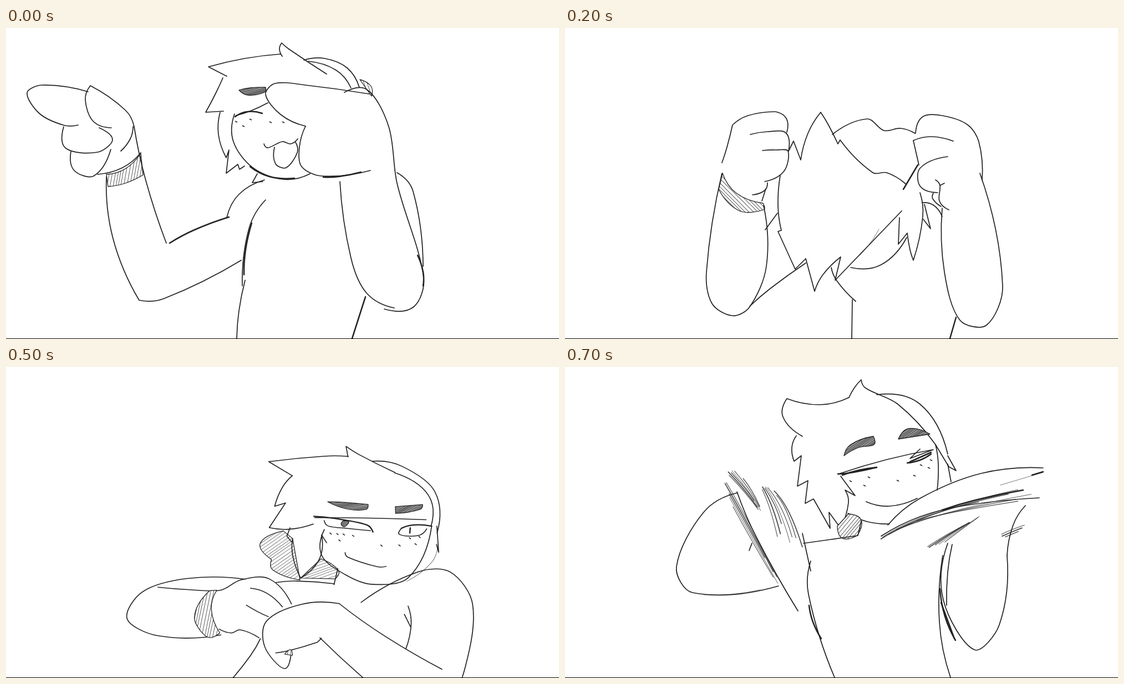
An HTML page with a canvas that plays this animation: 997 by 561 pixels, repeating every 800 ms.

```html
<!DOCTYPE html>
<html>
<head>
<meta charset="utf-8">
<style>
html, body { margin: 0; width: 100%; height: 100%; overflow: hidden; background: #fff; }
canvas { display: block; }
</style>
</head>
<body>
<canvas id="stage" width="997" height="561"></canvas>
<script>
const ctx = document.getElementById("stage").getContext("2d");

const add = (p, v, k) => [p[0] + v[0] * k, p[1] + v[1] * k];
const dist = (a, b) => Math.hypot(a[0] - b[0], a[1] - b[1]);
const points = text => text.trim().split(" ").map(p => p.split(",").map(Number));
const noise = n => Math.abs(Math.sin(n * 127.1) * 437.5) % 1;

// Smooth line through the points; "|" makes a corner.
function curve(text) {
  const path = new Path2D();
  let last;
  for (const part of text.split("|")) {
    const pts = points(part);
    if (last) pts.unshift(last);
    else path.moveTo(...pts[0]);
    const slope = pts.map((p, i) => {
      const a = pts[i - 1], b = pts[i + 1];
      return a && b && add([0, 0], add(b, a, -1), 1 / (dist(a, p) + dist(p, b)));
    });
    for (let i = 1; i < pts.length; i++) {
      const a = pts[i - 1], b = pts[i], d = dist(a, b);
      const s = slope[i - 1], e = slope[i];
      if (s && e) path.bezierCurveTo(...add(a, s, d / 3), ...add(b, e, -d / 3), ...b);
      else if (s) path.quadraticCurveTo(...add(a, s, d / 2), ...b);
      else if (e) path.quadraticCurveTo(...add(b, e, -d / 2), ...b);
      else path.lineTo(...b);
    }
    last = pts[pts.length - 1];
  }
  return path;
}

function ink(path, width, alpha = 1) {
  ctx.lineWidth = width;
  ctx.globalAlpha = alpha;
  ctx.stroke(path);
  ctx.globalAlpha = 1;
}
const pen = text => ink(curve(text), 1.7);
const bold = text => ink(curve(text), 2.5);
const thin = text => ink(curve(text), 1, 0.6);

function hatch(angle, text, gap = 5, alpha = 0.75, tone = "#fff", edge = 1.3) {
  const path = curve(text), lines = new Path2D();
  for (let i = -40; i <= 40; i++) {
    lines.moveTo(-150, i * gap + Math.sin(i * 7));
    lines.lineTo(150, i * gap + Math.sin(i * 5));
  }
  ctx.save();
  ctx.clip(path);
  ctx.fillStyle = tone;
  ctx.fill(path);
  ctx.translate(...points(text.split("|")[0])[0]);
  ctx.rotate(angle * Math.PI / 180);
  ink(lines, 1, alpha);
  ctx.restore();
  if (edge) ink(path, edge);
}
const dark = (angle, text) => hatch(angle, text, 2.6, 0.75, "#999");
const shade = text => hatch(90, text, 3, 0.3, "#fff", 0);

function dots(text) {
  for (const [x, y] of points(text)) {
    const path = new Path2D();
    path.moveTo(x - 1.5, y - 0.7);
    path.lineTo(x + 1.5, y + 0.7);
    ink(path, 1.7);
  }
}

// Loose strokes filling the band between two curves of three points each.
function streaks(count, from, to) {
  const [a, b] = [points(from), points(to)];
  for (let i = 0; i < count; i++) {
    const k = i / (count - 1);
    const [p, m, q] = a.map((v, j) => add(v, add(b[j], v, -1), k));
    const start = add(p, add(m, p, -1), noise(i + 1) * 0.5);
    const end = add(q, add(m, q, -1), noise(i + 9) * 0.6);
    const path = new Path2D();
    path.moveTo(...start);
    path.quadraticCurveTo(...m, ...end);
    ink(path, 0.9 + noise(i + 5), 0.8);
  }
}

function point() {
  // pointing hand
  pen("130,175 103,175 60,154 38,117 65,103 148,115");
  pen("231,178 215,148 152,104 | 143,130 157,168 190,180");
  pen("229,178 224,200 207,222");
  pen("168,180 192,202 165,224 108,217 104,178");
  pen("117,223 123,257 158,267 189,219");
  pen("165,264 210,252 243,225");
  hatch(100, "181,264 215,254 243,226 | 247,265 | 215,280 184,286 | 181,264");
  pen("181,268 193,380 240,491 | 285,488 424,419");
  pen("231,178 252,275 289,388");
  bold("295,388 340,364 402,341");
  // body
  pen("398,342 420,300 466,274");
  pen("453,263 444,279 | 463,277");
  pen("468,310 438,362 426,465");
  bold("443,352 432,400 429,445");
  pen("431,455 420,510 416,560");
  bold("648,485 624,560");
  // head
  pen("495,47 430,55 365,70 | 398,87");
  pen("391,90 378,118 360,152 | 392,150");
  pen("386,152 383,192 397,234 | 402,220 | 397,262 | 418,246 | 421,255 | 430,249");
  pen("498,51 493,38 497,27 | 510,38 578,83");
  pen("537,58 575,55 615,72 637,107");
  pen("545,60 595,76 622,108");
  hatch(70, "638,93 658,105 659,123 | 638,93");
  pen("412,155 410,205 445,252 500,273 548,263");
  bold("440,250 475,268 520,271");
  pen("414,158 440,150 472,135");
  bold("413,160 435,151 462,154");
  dark(-15, "420,112 440,108 468,107 | 466,116 436,121 420,112");
  dots("428,177 441,165 477,170 415,169 500,170");
  pen("465,209 472,216 498,205 513,209 526,200");
  pen("484,215 486,245 505,252 525,225 522,206");
  // near arm
  pen("540,177 495,156 468,120 485,100 540,103 655,119");
  pen("540,177 529,215 533,250 570,267 657,257");
  bold("572,269 600,268 640,260");
  pen("610,116 652,112 690,178 705,280 753,450 735,503 682,507");
  pen("602,277 622,415 650,478 700,505");
  pen("705,261 734,295 752,430");
  bold("742,410 752,440 752,465");
}

function wave() {
  // open hand
  pen("236,152 185,118 138,119 146,147 194,179 | 192,196");
  thin("236,152 262,160");
  pen("262,160 290,108 325,91 333,130 307,190");
  pen("307,190 309,238 297,270 275,292");
  pen("194,197 130,210 106,248 135,266 183,250 197,228");
  pen("187,248 146,308 180,323 222,302 229,265");
  hatch(-40, "230,289 250,295 278,293 | 265,312 222,303 | 230,289");
  // body
  pen("157,320 130,385 134,438 215,449 330,437 445,393");
  pen("266,312 244,370 229,395");
  pen("244,360 290,353 362,347");
  pen("358,347 390,323 428,304");
  pen("432,370 445,394 | 455,408 462,440 476,487");
  pen("474,482 478,560");
  pen("688,392 670,461");
  pen("671,458 671,560");
  pen("670,383 745,407 848,409 | 865,395 865,368 | 825,307 732,237");
  pen("683,280 745,360 797,393");
  pen("620,283 655,282 694,307");
  pen("655,262 675,277 697,280");
  // hand at the face
  pen("730,245 720,185 665,127 600,88 582,105 614,154");
  pen("629,155 570,185 560,218 638,208");
  pen("638,208 605,238 586,273 662,263");
  // head
  pen("397,73 470,97 500,99");
  pen("499,99 498,70 502,38 | 526,68 575,102");
  pen("397,73 390,100 388,130 | 370,137 352,138 | 358,158 372,178");
  pen("383,182 361,206 357,232 385,222 | 382,240 386,250 | 397,246");
  pen("455,88 475,80 498,76");
  pen("533,73 558,70 590,88");
  hatch(60, "588,82 610,77 650,90 | 648,107 | 615,95 588,82");
  pen("403,160 399,240 430,295 493,320 555,294 576,270");
  bold("450,308 493,320 562,288");
  pen("398,156 440,160 557,160 | 530,171 | 590,172");
  dark(-30, "405,172 425,153 446,148 | 447,157 428,170 405,172");
  dark(-30, "486,158 505,154 553,160 | 535,170 | 486,164 | 486,158");
  shade("410,172 447,172 | 450,204 | 410,202");
  shade("503,172 528,173 | 526,197 | 504,206");
  shade("540,174 560,176 | 558,188 | 540,192");
  bold("403,206 430,205 452,209");
  bold("410,201 430,203 450,208");
  bold("504,209 530,196 562,189");
  dots("412,216 421,228 441,219 460,239 486,239 526,217 541,215 546,207");
  pen("469,267 480,270 501,261 549,237 | 542,268 512,298 485,269");
}

function fists() {
  // left arm
  pen("283,243 292,215 302,175 | 330,158 380,151 | 399,163 400,188");
  pen("334,192 365,187 398,189 403,222");
  pen("356,221 380,220 402,222 395,258 360,277");
  pen("365,279 360,293 338,301");
  pen("362,290 355,312");
  hatch(45, "284,262 309,298 357,316 | 358,328 315,330 277,291 | 284,262");
  pen("283,262 255,440 265,497 302,519 333,503 363,430 358,320");
  pen("333,502 370,470 434,424");
  pen("361,364 383,334");
  // hair
  pen("403,222 412,204 | 425,238 | 438,190 461,152 | 475,175 492,209 | 496,202 | 555,261 580,261 614,281");
  pen("482,192 545,164 575,185 605,181 631,190");
  pen("388,266 384,320 390,365 | 384,367 | 415,435 | 434,416 | 450,475 | 465,445 497,413 | 487,455 | 607,330");
  thin("520,420 545,395 566,363");
  pen("480,432 490,456 524,493");
  pen("518,490 517,560");
  pen("515,432 570,427 616,378");
  pen("603,342 601,390 | 617,370 | 622,400 628,419 | 645,340 640,297");
  bold("610,291 636,247");
  pen("646,345 659,362 | 648,318");
  pen("644,315 665,320 680,340");
  // right arm
  pen("632,190 645,160 680,158 725,174 746,205 752,275");
  pen("628,203 660,196 700,204");
  pen("628,203 638,247");
  pen("690,232 640,253 640,285 672,297");
  pen("668,274 | 676,284 675,312 692,328");
  pen("676,284 684,280");
  pen("664,298 663,308 678,322");
  pen("680,325 684,440 712,527 760,536 789,465 748,262");
  bold("705,522 694,560");
}

function bow() {
  pen("390,158 470,122 560,111 680,146");
  thin("680,146 725,187 751,235");
  streaks(4, "392,157 510,118 683,160", "400,156 510,137 668,172");
  thin("556,120 530,119 495,133");
  pen("495,133 443,200 478,249");
  thin("655,147 625,145 600,153");
  pen("600,153 563,200 579,248");
  thin("362,182 362,185");
  // back
  pen("380,560 360,440 380,322 430,272 500,257 545,264 595,263 655,315 675,391");
  bold("527,262 545,264");
  bold("645,300 660,325 668,350");
  pen("294,560 320,458 366,363");
  // head
  pen("597,262 650,240 705,266 733,323");
  pen("711,270 723,252 | 743,288");
  pen("733,323 755,243 | 774,285 769,338 | 777,335 | 750,362 732,394");
  pen("700,342 701,322 | 710,333 | 717,317 | 724,330 | 731,320");
  pen("763,353 772,388 747,430");
  // near arm
  pen("663,321 715,360 745,445 804,560");
  bold("703,346 738,422 747,455");
  pen("665,400 640,425 627,500 637,560");
  pen("655,432 670,475 718,560");
  bold("637,429 657,433");
  hatch(80, "640,430 634,460 645,487 670,484 | 657,433 | 640,430");
  hatch(100, "750,415 762,403 768,420 750,460 | 750,415");
}

function smirk() {
  // hair
  pen("482,57 473,38 | 500,46 571,59");
  pen("482,56 440,70 348,113 | 396,126");
  pen("396,126 385,155 382,195 | 399,182 | 384,239 | 420,230 458,206");
  pen("571,60 640,82 662,140");
  pen("526,51 580,43 650,72 676,150");
  pen("672,137 689,186 | 681,172");
  thin("684,175 682,210 650,260");
  pen("457,193 550,162 650,131");
  hatch(-55, "410,237 377,275 405,299 | 413,318 465,321 | 430,246 | 410,237", 5, 0.6);
  hatch(-40, "490,268 465,317 | 525,298 | 526,280 490,268", 5, 0.6);
  pen("420,227 419,245 | 430,253");
  pen("430,246 440,280 465,317 | 487,270 478,222 | 491,234");
  // face
  dark(-30, "471,155 500,146 542,136 | 541,147 510,157 471,155");
  dark(-50, "590,124 636,104 | 634,115 594,137 | 590,124");
  bold("455,191 490,183 550,176 565,186");
  pen("475,193 485,201 520,194 560,185");
  dark(80, "508,182 506,190 513,193 518,181 508,182");
  bold("612,162 630,149 663,140");
  pen("612,162 612,175 645,166 656,148");
  bold("627,156 629,166");
  dots("493,214 505,211 516,208 512,222 533,205 587,207 618,196 632,176 645,184 648,168");
  pen("528,242 535,249 590,250 606,244");
  pen("480,210 490,262 540,284 590,287 650,253 663,140");
  // body
  pen("524,277 526,310");
  pen("582,328 665,235 720,217 775,265 796,390 785,505");
  pen("425,340 460,325 526,308");
  pen("370,352 270,385 200,437 188,498 250,512 358,473");
  pen("665,307 680,340 684,390");
  pen("663,325 680,345");
  pen("428,457 420,495 397,560");
  bold("659,487 628,560");
  // hands
  pen("224,419 280,405 333,388 363,356 410,337 463,372");
  hatch(85, "327,390 328,430 355,470 | 335,485 303,455 315,395 | 327,390");
  pen("384,366 415,366 449,383");
  pen("386,401 410,407 430,410");
  pen("352,463 375,463 388,452 425,456");
  pen("545,343 480,367 429,420 440,470 485,500 488,462");
  pen("462,475 485,462 528,430 | 533,420");
  hatch(85, "478,472 486,460 492,470 | 478,472");
  pen("545,343 640,378 757,408");
  pen("530,420 640,478 700,502 782,508");
}

function sweep() {
  // hair
  pen("512,55 522,37 534,23 | 542,38 600,67 668,140");
  pen("512,55 460,68 400,57 | 393,90 428,125");
  pen("417,124 409,145 413,170 | 426,160 | 419,215 | 438,205 | 433,246 | 448,238 | 478,291 | 476,262 | 497,291 | 511,245 505,222 | 523,232 | 497,197");
  pen("562,50 640,67 690,157");
  pen("668,140 692,180 | 705,187 | 690,160");
  pen("690,175 696,207");
  pen("496,192 580,167 664,149 | 622,165 | 640,148");
  // face
  dark(-35, "503,160 515,140 556,125 | 557,140 530,145 503,160");
  dark(-35, "601,130 620,111 658,121 | 601,130");
  bold("492,193 520,190 562,181");
  bold("500,195 530,186 562,181");
  bold("617,173 640,168 660,157");
  bold("622,171 660,154");
  dots("515,206 540,214 548,199 600,205 630,196 642,177 656,182 660,168");
  pen("543,243 585,251 635,237");
  pen("510,264 545,279 585,283");
  pen("668,140 673,175 671,222");
  hatch(-50, "491,287 500,309 527,304 | 534,276 511,265 | 491,287");
  pen("430,318 480,311 528,304 | 534,278");
  // left arm
  pen("311,227 250,262 201,360 230,407 385,395");
  thin("250,411 300,410 352,402");
  pen("337,318 332,331");
  pen("310,225 345,307 420,440");
  streaks(5, "276,183 330,275 390,395", "298,243 340,320 385,395");
  streaks(6, "285,184 325,225 352,262", "306,183 337,220 355,260");
  streaks(7, "350,210 370,250 385,315", "368,215 405,250 428,325");
  // body
  pen("428,300 443,368");
  pen("443,350 439,410 486,560");
  bold("440,430 447,460 462,490");
  pen("681,340 675,460 695,560");
  bold("676,400 685,450 704,493");
  bold("678,425 702,490");
  // right arm
  pen("690,318 682,420 738,510 783,465 797,340");
  pen("698,320 690,370 688,430");
  pen("582,285 640,237 750,192 862,182");
  bold("842,195 862,189");
  thin("785,213 862,190");
  pen("570,305 640,270 720,250 855,236");
  bold("680,258 740,240 826,222");
  streaks(6, "547,325 640,260 845,215", "600,290 670,265 855,236");
  streaks(5, "640,333 690,300 735,278", "682,318 705,300 755,264");
  pen("830,250 808,285 797,340");
  streaks(3, "780,305 805,293 832,284", "790,308 810,300 826,293");
}

// drawing, lean in radians, vertical squash, drop in pixels
const poses = [
  [point], [wave], [fists], [fists, 0.18, 0.85, 10],
  [bow], [smirk, 0.3, 0.9, 40], [smirk], [sweep]
];

function show(time) {
  const [draw, lean = 0, squash = 1, drop = 0] = poses[Math.floor(time % 800 / 100)];
  ctx.fillStyle = "#fff";
  ctx.fillRect(0, 0, 997, 561);
  ctx.save();
  ctx.strokeStyle = "#222";
  ctx.lineCap = ctx.lineJoin = "round";
  ctx.translate(500, 560 + drop);
  ctx.rotate(lean);
  ctx.scale(1, squash);
  ctx.translate(-500, -560);
  draw();
  ctx.restore();
  ctx.fillStyle = "#000";
  ctx.fillRect(0, 560, 997, 1);
  requestAnimationFrame(show);
}
requestAnimationFrame(show);
</script>
</body>
</html>
```
